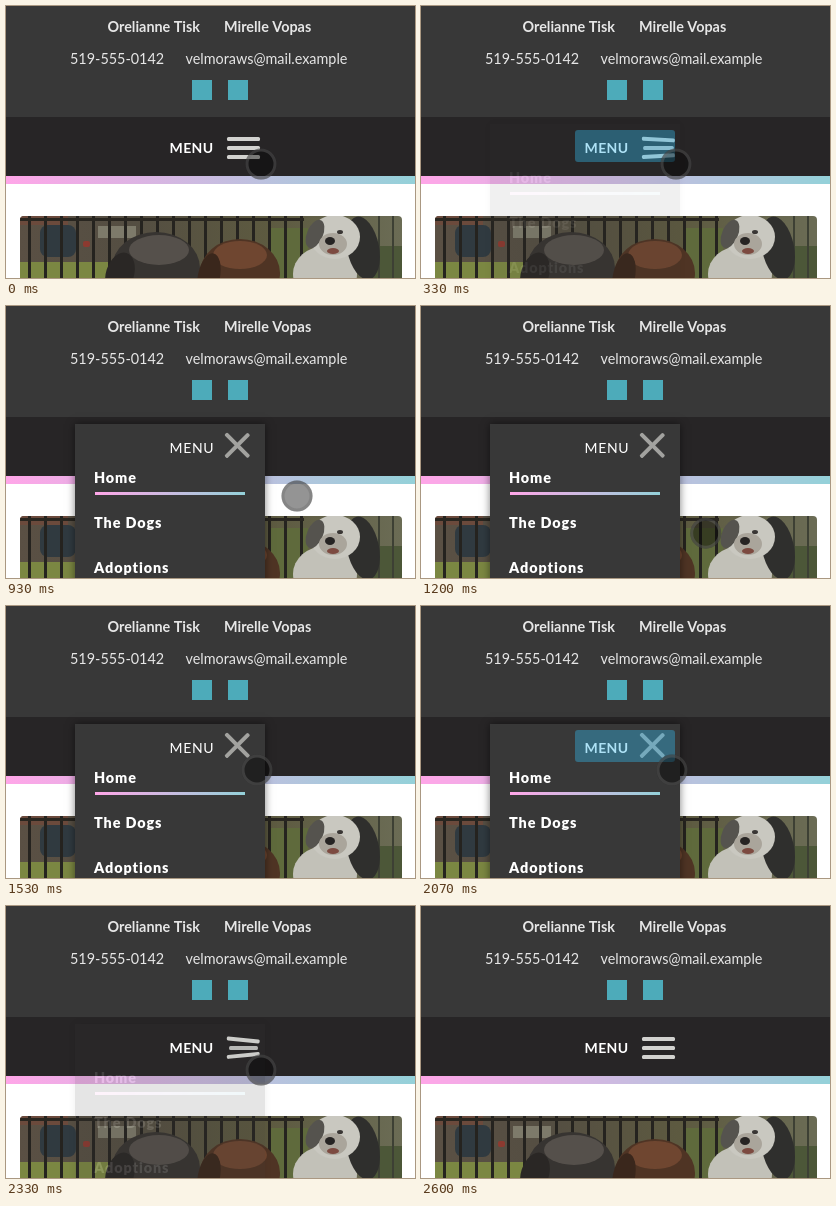
Write an HTML page with a canvas that moves like this. It is 409 by 272 pixels and loops after 3540 ms.

```html
<!DOCTYPE html>
<html lang="en">
<head>
<meta charset="utf-8">
<title>Menu</title>
<style>
  html, body { margin: 0; width: 100%; height: 100%; overflow: hidden; background: #fff; }
  canvas { display: block; width: 409px; height: 272px; }
</style>
</head>
<body>
<canvas id="stage" width="409" height="272"></canvas>
<script>
const W = 409, H = 272, LOOP = 3540, STEP = 1000 / 15;
const OPEN_TAP = 267, CLOSE_TAP = 2067, DELAY = 33, FADE = 400;
const ctx = document.getElementById('stage').getContext('2d');

const clamp = v => Math.max(0, Math.min(1, v));
const mix = (a, b, p) => a + (b - a) * p;

// CSS "ease": cubic-bezier(.25, .1, .25, 1)
function ease(x) {
  if (x <= 0 || x >= 1) return clamp(x);
  const bez = (s, a, b) => 3 * s * (1 - s) ** 2 * a + 3 * s * s * (1 - s) * b + s ** 3;
  let lo = 0, hi = 1;
  for (let i = 0; i < 20; i++) {
    const mid = (lo + hi) / 2;
    if (bez(mid, .25, .25) < x) lo = mid; else hi = mid;
  }
  return bez(lo, .1, 1);
}

function layer(paint) {
  const c = document.createElement('canvas');
  c.width = W;
  c.height = H;
  paint(c.getContext('2d'));
  return c;
}

function rect(g, color, x, y, w, h, r = 0) {
  g.fillStyle = color;
  g.beginPath();
  g.roundRect(x, y, w, h, r);
  g.fill();
}

function blob(g, color, x, y, rx, ry, turn = 0) {
  g.fillStyle = color;
  g.beginPath();
  g.ellipse(x, y, rx, ry, turn, 0, 7);
  g.fill();
}

function text(g, str, x, y, { weight = 400, color = '#e6e6e6', spacing = 0, size = 14.4 } = {}) {
  g.font = `${weight} ${size}px Lato, sans-serif`;
  g.letterSpacing = spacing + 'px';
  g.fillStyle = color;
  g.fillText(str, x, y);
}

function rainbow(g, x, w) {
  const grad = g.createLinearGradient(x, 0, x + w, 0);
  grad.addColorStop(0, '#ffa6e8');
  grad.addColorStop(1, '#94d1d9');
  return grad;
}

function photo(g) {
  g.save();
  g.beginPath();
  g.roundRect(14, 210, 382, 80, 4);
  g.clip();

  const back = g.createLinearGradient(14, 0, 396, 0);
  back.addColorStop(0, '#5a5044');
  back.addColorStop(.3, '#544e42');
  back.addColorStop(.65, '#5d5a40');
  back.addColorStop(1, '#6b6c55');
  rect(g, back, 14, 210, 382, 62);
  rect(g, '#6b4a3c', 14, 210, 48, 9);
  rect(g, '#7d7a6a', 92, 220, 38, 12);
  rect(g, '#7b8742', 14, 256, 96, 16);
  rect(g, '#303a40', 34, 219, 36, 32, 8);
  rect(g, '#8c3a30', 77, 235, 7, 6, 2);
  rect(g, '#5f6a3c', 262, 222, 40, 50);
  rect(g, '#4c5738', 366, 240, 30, 32);

  for (let x = 22; x < 300; x += 16) rect(g, '#25231f', x, 210, 3, 62);
  for (let x = 372; x < 396; x += 14) rect(g, '#3d4034', x, 210, 2, 62);
  rect(g, '#292620', 14, 212, 284, 3);

  // three dogs
  blob(g, '#373431', 150, 262, 44, 36);
  blob(g, '#55504b', 153, 244, 30, 15);
  blob(g, '#2a2725', 114, 268, 14, 22, .3);
  blob(g, '#4f3424', 234, 267, 40, 34);
  blob(g, '#6f4630', 234, 249, 27, 14);
  blob(g, '#3a271c', 203, 270, 11, 23, .2);
  blob(g, '#c2c1b8', 319, 268, 32, 28);
  blob(g, '#2f2f2d', 357, 242, 16, 32, -.2);
  blob(g, '#c9c8c0', 329, 231, 25, 22);
  blob(g, '#55534e', 309, 228, 8, 15, .4);
  blob(g, '#aaa59b', 327, 238, 14, 11);
  blob(g, '#262423', 324, 235, 5, 4);
  blob(g, '#7c4a40', 327, 245, 6, 3);
  blob(g, '#393634', 334, 226, 3, 2);
  g.restore();
}

const page = layer(g => {
  const bold = { weight: 700 };
  rect(g, '#fff', 0, 0, W, H);
  rect(g, '#383838', 0, 0, W, 111);
  rect(g, '#272526', 0, 111, W, 59);
  rect(g, rainbow(g, 0, W), 0, 170, W, 8);
  text(g, 'Orelianne Tisk', 101.5, 26, bold);
  text(g, 'Mirelle Vopas', 218, 26, bold);
  text(g, '519-555-0142', 64, 58);
  text(g, 'velmoraws@mail.example', 179.5, 58);
  rect(g, '#4dabba', 186, 74, 20, 20);
  rect(g, '#4dabba', 222, 74, 20, 20);
  photo(g);
});

const panel = layer(g => {
  g.shadowColor = 'rgba(0,0,0,.5)';
  g.shadowBlur = 8;
  rect(g, '#383838', 69, 118, 190, 180);
  g.shadowBlur = 0;
  g.shadowColor = 'transparent';
  ['Home', 'The Dogs', 'Adoptions'].forEach((label, i) =>
    text(g, label, 88, 177 + 45 * i, { weight: 900, color: '#fff', spacing: .9 }));
  rect(g, rainbow(g, 89, 150), 89, 186, 150, 3);
});

function bar(x, y, shade, { angle = 0, alpha = 1, length = 33 } = {}) {
  ctx.save();
  ctx.globalAlpha = alpha;
  ctx.translate(x, y);
  ctx.rotate(angle);
  rect(ctx, `rgb(${shade},${shade},${shade - 3})`, 0, -2, length, 4, 1.5);
  ctx.restore();
}

function menuButton(p, resting) {
  const face = resting ? { weight: 400, spacing: .7 } : { weight: 700, spacing: .4 };
  text(ctx, 'MENU', 163.5, 147, { ...face, color: '#fff', size: 14 });
  const shade = Math.round(mix(210, 162, p)), angle = p * Math.PI / 4;
  const x = mix(221, 219.6, p);
  bar(x, mix(133, 127.6, p), shade, { angle });
  bar(221 + 16.5 * p, 142, shade, { alpha: 1 - p, length: 33 * (1 - p) });
  bar(x, mix(151, 151.2, p), shade, { angle: -angle });
}

// Tap highlight holds briefly, then fades
function tapGlow(age) {
  if (age < -1 || age > 200) return;
  ctx.globalAlpha = clamp((200 - age) / 100);
  rect(ctx, 'rgba(51,181,229,.4)', 154, 124, 100, 32, 3);
  ctx.globalAlpha = 1;
}

// Pointer stops: time, x, y
const path = [
  [0, 255, 158], [733, 255, 158], [933, 291, 190], [1067, 291, 190],
  [1300, 280, 255], [1533, 251, 164], [2067, 251, 164], [2333, 255, 164], [2599, 255, 164]
];

function pointer(t) {
  const i = path.findIndex(stop => stop[0] > t);
  if (i < 1) return;
  const [t0, x0, y0] = path[i - 1], [t1, x1, y1] = path[i];
  const p = (t - t0) / (t1 - t0);
  const x = mix(x0, x1, p), y = mix(y0, y1, p);
  blob(ctx, 'rgba(0,0,0,.42)', x, y, 15.5, 15.5);
  ctx.strokeStyle = 'rgba(110,110,110,.4)';
  ctx.lineWidth = 3;
  ctx.beginPath();
  ctx.arc(x, y, 14, 0, 7);
  ctx.stroke();
}

function draw(now) {
  // The picture advances at 15 steps per second
  const t = Math.floor((now % LOOP + 4) / STEP) * STEP + .1;
  const since = tap => ease((t - tap - DELAY) / FADE);
  const p = clamp(since(OPEN_TAP) - since(CLOSE_TAP));
  ctx.drawImage(page, 0, 0);
  ctx.globalAlpha = p;
  ctx.drawImage(panel, 0, 0);
  ctx.globalAlpha = 1;
  menuButton(p, t > 730 && t < 2060);
  tapGlow(t - OPEN_TAP);
  tapGlow(t - CLOSE_TAP);
  pointer(t);
}

const start = performance.now();
function tick() {
  draw(performance.now() - start);
  requestAnimationFrame(tick);
}
tick();
</script>
</body>
</html>
```
